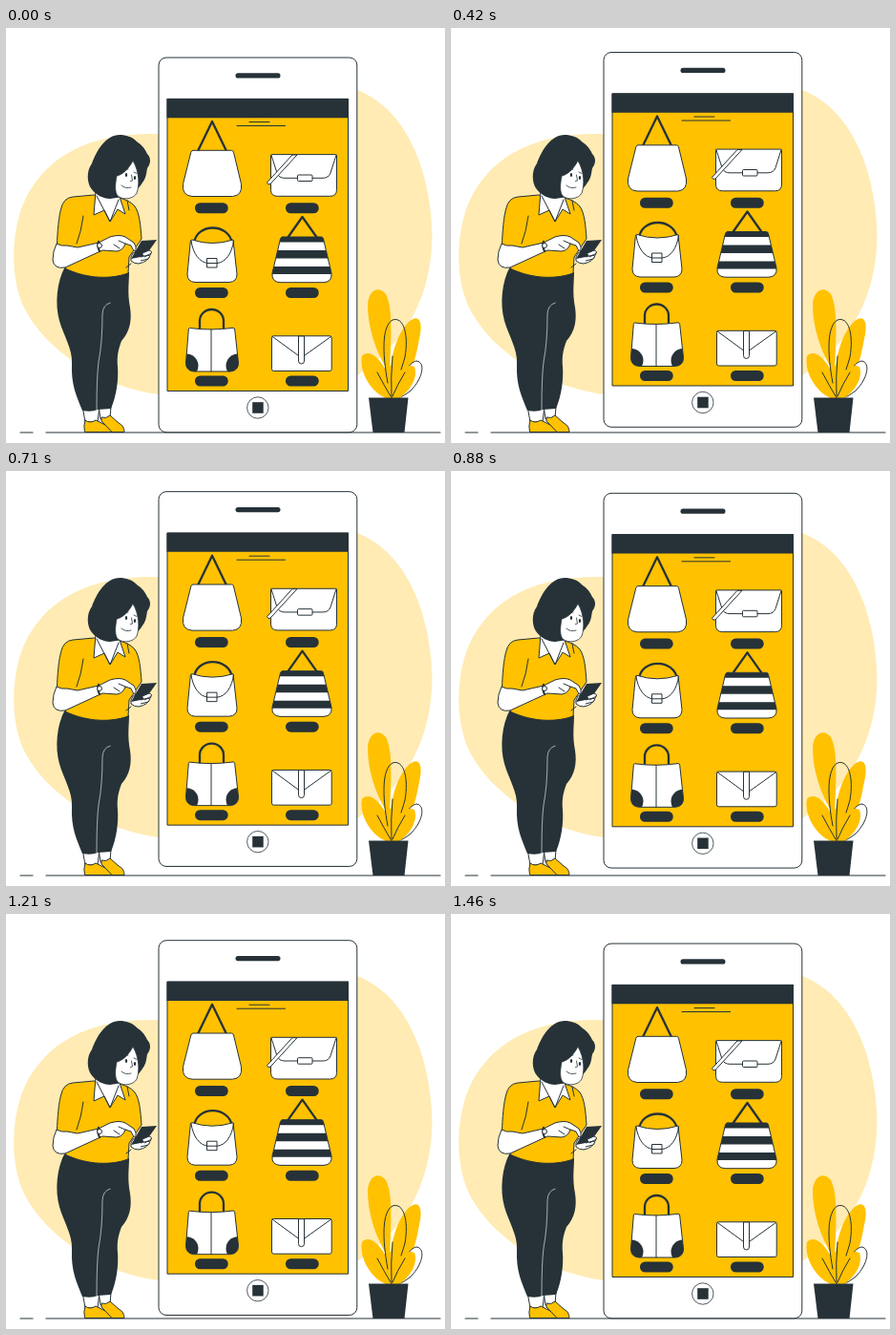
An HTML page that plays this animation: 460x435 px, repeating every 1.5 s.

```html
<!DOCTYPE html>
<html lang="en">
<head>
<meta charset="utf-8">
<title>Online bag shop</title>
<style>
  html, body { margin: 0; width: 100%; height: 100%; overflow: hidden; background: #fff; }
  svg { display: block; width: 460px; height: 435px; }
  .ink { fill: #263238; }
  .gold { fill: #ffc100; }
  .line { fill: none; stroke: #263238; stroke-linecap: round; stroke-linejoin: round; }
  .paper { fill: #fff; stroke: #263238; stroke-linejoin: round; }
  .cloth { fill: #ffc100; stroke: #263238; stroke-linejoin: round; }
  .handle { stroke-width: 2.3; }
</style>
</head>
<body>
<svg viewBox="0 0 460 435">
  <defs>
    <clipPath id="striped"><path id="stripedBody" d="M290 219H330.500q1.500 0 2 2L341 257q1 9-8 9.700H287q-9-.7-8-9.700L287.500 221q.5-2 2.500-2z"/></clipPath>
    <clipPath id="tote"><path id="toteBody" d="M192.500 314.500Q215 317.500 238 314.300q1.500 0 1.700 1.700L243.500 351q0 8-8 9H196.500q-8-1-8-9L191.300 316q.2-1.500 1.200-1.500z"/></clipPath>
  </defs>

  <path fill="#ffebb3" d="M160 111C106 110 50 122 21 178C6 207 2 262 21 297C42 336 96 376 160 384H330C406 352 446.500 295 446.500 215C445 150 420 85 368 65Z"/>
  <path class="line" d="M15 424H28M42 424H455" stroke-width="1.200"/>

  <g id="plant">
    <path class="gold" d="M402 362C386 338 379 312 379 290C380 274 391 270 398 279C405 293 404 318 402 362z
      M405 388C398 355 408 322 422 308C434 298 437 310 433 326C429 349 422 372 411 388z"/>
    <path class="paper" d="M407 388C413 367 421 351 430 349C440 350 437 368 423 381Q418 385 411 388z"/>
    <path class="gold" d="M398 388C380 380 370 358 373 344C380 336 391 346 397 357Q404 350 412 358Q420 352 428 355C432 366 424 380 412 388z"/>
    <path class="line" d="M400 372C394 340 394 312 405 306C417 302 422 322 418 345Q416 352 414 358M389 361Q397 376 403 386M405 344Q403 366 404 388M418 361Q410 374 405 386"/>
    <path class="ink" d="M380 387.500H421.500L417.500 424H384.500z"/>
  </g>

  <g id="phone">
    <rect class="paper" x="160" y="31" width="207.800" height="392.800" rx="8"/>
    <rect class="ink" x="240.500" y="47.300" width="47" height="5.200" rx="2.600"/>
    <rect class="cloth" x="169" y="74.300" width="189.500" height="306.200"/>
    <path class="ink" d="M168.500 74H359V94.200H168.500z"/>
    <path class="line" d="M255 98.500H276M242 102.500H292.500"/>
    <circle class="paper" cx="263.800" cy="398" r="11.200" stroke-width=".8"/>
    <path class="ink" d="M258.200 392.200H269.700V403.800H258.200z"/>

    <path class="line handle" d="M201 129L216 98L231 129"/>
    <path class="paper" d="M196 128.300H236.500q1.500 0 2 2L246.500 163.500q1.500 12-9 13H195q-11-1-9.500-13L193.800 130.300q.6-2 2.200-2z"/>

    <path class="paper" d="M278.500 132.600H345.500q1 0 1 1V169.500q0 6.800-7 6.800H284.500q-7 0-7-6.800V133.600q0-1 1-1z"/>
    <path class="line" d="M278 133.300L284 152q2 5.300 8 5.300H332q6 0 8-5.300L346 133.300"/>
    <rect class="paper" x="305.500" y="154" width="15.500" height="6.500" rx="1"/>
    <path class="paper" d="M300 133H305L277 163.500q-2.500 1.500-3.500-1.500z"/>

    <path class="line handle" d="M197 226C199 204 234 204 237 226"/>
    <path class="paper" d="M195 222Q216 229 238 222L242 258q0 8-8 8.500H198q-8-.5-8-8.500L193.300 224q.2-2.200 1.700-2z"/>
    <path class="line" d="M194 223C196 237 203 246 212 246.500H221C230 246 237 236 238.500 223"/>
    <path class="paper" d="M210.500 241.500H221V251H210.500zM210.500 246.500H221"/>

    <path class="line handle" d="M295 220L310.500 198L326 220"/>
    <g clip-path="url(#striped)">
      <path fill="#fff" d="M278 218H342V268H278z"/>
      <path class="ink" d="M278 216H342V224.500H278zM278 233H342V241.500H278zM278 250H342V258H278z"/>
    </g>
    <use href="#stripedBody" class="line"/>

    <path class="line handle" d="M203 317V307a12.500 12 0 0 1 25 0V317"/>
    <use href="#toteBody" class="paper"/>
    <g class="ink" clip-path="url(#tote)"><circle cx="189" cy="354" r="12.500"/><circle cx="243" cy="354" r="12.500"/></g>
    <path class="line" d="M215 316V360"/>

    <rect class="paper" x="278.500" y="322.800" width="62.700" height="36.700" rx="2"/>
    <path class="line" d="M279 323.300L306.500 343.500M340.700 323.300L312.500 343.500"/>
    <path class="paper" d="M306.500 323H312.500V349a3 3 0 0 1-6 0z"/>
    <g id="labels" class="ink"></g>
  </g>

  <g id="shopper">
    <path class="paper" d="M80 396L83 413H96L98 396zM97 396L99 410H109L110 396z"/>
    <path class="cloth" d="M83 411Q88 415 94 411L106 417Q112 419 111 423.500H82.500Q81 417 83 411z"/>
    <path class="cloth" d="M100 408Q105 410 109 406L118 414Q124 417 124 423.500H111Q104 416 100 412z"/>
    <path class="ink" d="M62 250C53 266 51 290 56 307C60 322 70 336 69 352C68 374 74 386 80 401Q90 403 96 400L110 399C116 385 118 368 117 355C116 343 118 336 121 328C130 318 132 306 130 293C127 277 129 267 129 256z"/>
    <path fill="none" stroke="#fff" stroke-width=".6" d="M109.500 288Q101.500 290 101 300Q101 330 97 350Q95 366 95 400"/>
    <path class="cloth" d="M92 175L70 177Q60 178 57.500 190C54 204 54 220 53 232L66 236L62 252C80 261 106 265 128 257L129 240L142 221C141 207 140 194 135 187Q129 180 118 178z"/>
    <path class="line" d="M81 197Q79 213 74 226M127 181L129 191M126 251L131 247"/>
    <path class="paper" d="M94 171L92 196L103 191L109 203L117 190L125 195L119 177z"/>
    <path class="line" d="M95 176L109 203L118 180"/>
    <path class="ink" d="M119 112C105 112 95 128 90 142C84 150 85 162 89 168C94 175 102 179 109 179L122 177C131 176 138 170 143 162C147 157 147 152 148 147C152 142 152 136 148 132C145 125 141 122 137 119C132 114 126 112 119 112z"/>
    <path class="paper" d="M133 139C128 149 121 154 116 155C114 165 114 172 117 176C123 181 134 179 137 173C140 165 140 151 133 139z" stroke-width=".8"/>
    <path class="line" d="M131.500 154L132.500 160L130.500 160.500M121 165Q125 169 131 167M123 149Q126 147 128 148M134 151L137 152.500" stroke-width=".8"/>
    <path class="ink" d="M124.800 154a1.200 2 0 0 1 2.400 0a1.200 2 0 0 1-2.400 0zM133.800 157a1.200 2 0 0 1 2.400 0a1.200 2 0 0 1-2.400 0z"/>
    <path class="paper" d="M131 240Q132 235 137 234L149 233Q154 234 151 238Q149 245 139 247Q134 247 131 244z"/>
    <path class="ink" d="M142 223L158 222L146 239L131 242z"/>
    <path class="paper" d="M143 236L150 233Q154 234 151 237L145 240M141 240L149 238Q152 239 149 242L141 244"/>
    <path class="paper" d="M53 226Q58 229 64 228L75 230L97 225L109 219Q119 216 125 219L134 225Q137 229 136 234Q133 234 131 228L125 226Q123 233 116 234L101 233L62 251Q50 253 49 243Q49 234 53 226z"/>
    <path class="line" d="M113 227L119 231M118 223L125 226"/>
    <path class="line" d="M97 224Q95 228 98 234" stroke-width="2.200"/>
    <circle class="paper" cx="98" cy="228" r="2.500"/>
  </g>
</svg>
<script>
const LOOP = 1500, FRAMES = 36, RISE = 0.55;
const phone = document.getElementById('phone');

document.getElementById('labels').innerHTML = [183.3, 272, 364.5].map(y =>
  [198, 293].map(x => `<rect x="${x}" y="${y}" width="34.700" height="11" rx="5.300"/>`).join('')).join('');

// The phone floats up and back down at a constant speed, at 24 steps a second.
function draw() {
  const time = Math.floor(performance.now() % LOOP / 10) * 10 + 5;
  const step = Math.floor(time / LOOP * FRAMES);
  const lift = RISE * Math.min(step, FRAMES - 1 - step);
  phone.setAttribute('transform', `translate(0 ${-lift})`);
  requestAnimationFrame(draw);
}
draw();
</script>
</body>
</html>
```
